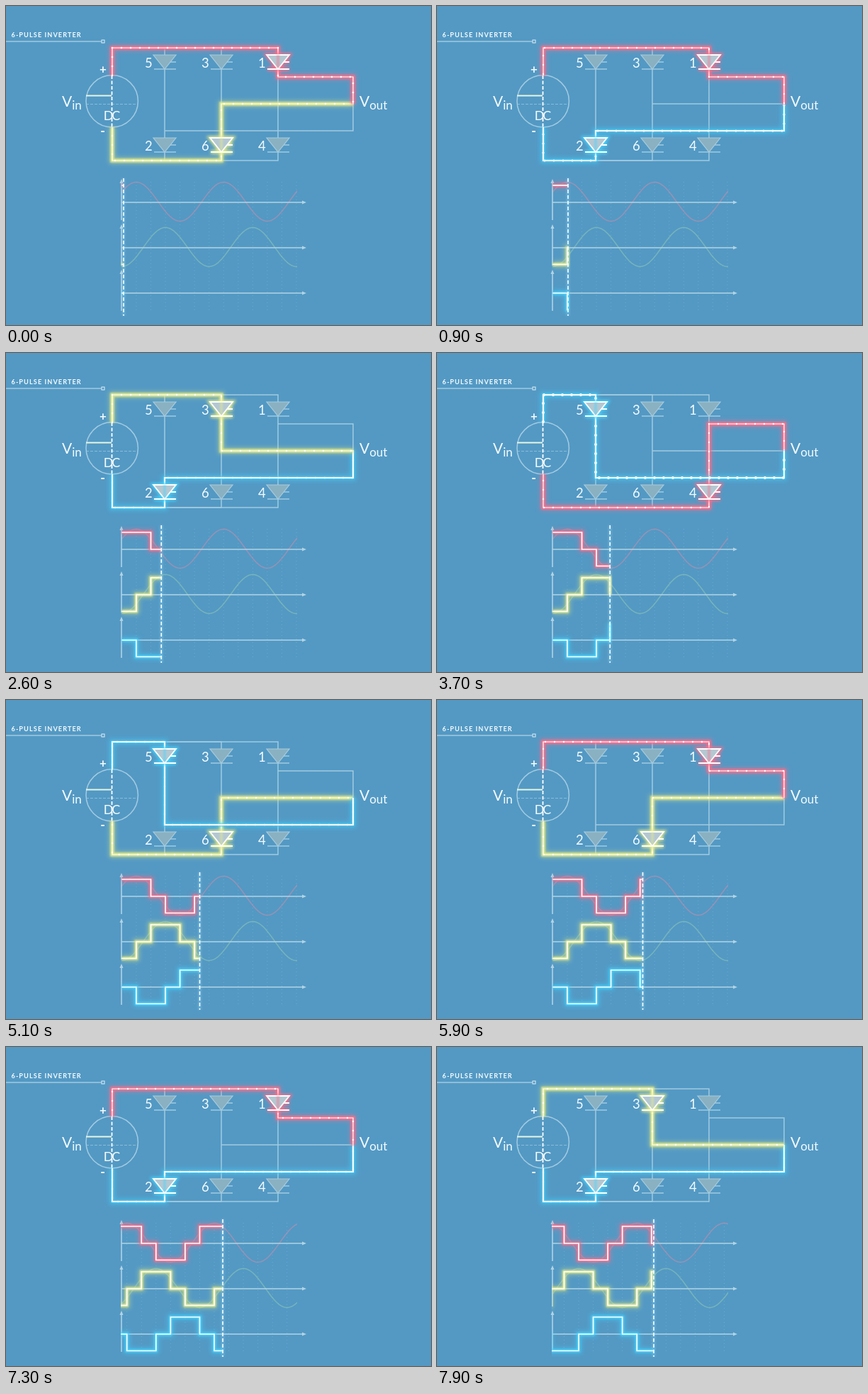
An HTML page that plays this animation: 600x450 px, repeating every 8000 ms.

```html
<!DOCTYPE html>
<html lang="en">
<head>
<meta charset="utf-8">
<title>6-pulse inverter</title>
<style>
html, body { margin: 0; width: 100%; height: 100%; overflow: hidden; background: #5399c4; }
svg { display: block; width: 600px; height: 450px; }
path, line, circle { fill: none; }
text { font-family: Lato, "Open Sans", sans-serif; fill: #f4fafd; }
.wire { stroke: #a3cae0; stroke-width: 1.5; }
.axis { stroke: #b2d3e5; stroke-width: 1.6; }
.tip { fill: #b2d3e5; }
.grid { stroke: #a8cfe4; stroke-dasharray: 1 4; opacity: .32; }
.sine { stroke-width: 1.5; opacity: .6; }
.glow { stroke-width: 6; filter: blur(1.3px); opacity: .9; }
.halo { stroke-width: 9; filter: blur(3px); opacity: .4; }
.core { stroke: #fff; }
.dots { stroke: #fff; stroke-linecap: round; stroke-dasharray: 0 13; }
.valve { fill: #89b1c2; stroke: #a9cbdc; stroke-width: 1.2; }
</style>
</head>
<body>
<svg id="stage" viewBox="0 0 600 450">
  <clipPath id="plot"><rect x="162" y="235" width="249" height="210"/></clipPath>
  <clipPath id="past"><rect id="pastBox" x="162" y="235" width="0" height="210"/></clipPath>
</svg>
<script>
const stage = document.getElementById('stage');
const UNIT = 20.55, START = 163.4, STOP = 306, LOOP = 8000;

const phases = [
  { x: 384, y: 100, top: 1, bottom: 4, base: 277, color: '#ff6d89', sine: '#c98ca8', core: 1.2 },
  { x: 304, y: 138, top: 3, bottom: 6, base: 341, color: '#e6ec88', sine: '#8ec6b4', core: 1.2 },
  { x: 224, y: 176, top: 5, bottom: 2, base: 405, color: '#45d5ff', core: 2.1 }
];
// Time and horizontal position of the plotting head, before scrolling.
const headKeys = [[0, 166], [900, 185], [2600, 219.3], [3700, 244.2],
                  [5100, 273.5], [6700, 307.5], [LOOP, 333]];

function add(tag, attrs, parent = stage) {
  const el = document.createElementNS('http://www.w3.org/2000/svg', tag);
  for (const name in attrs) el.setAttribute(name, attrs[name]);
  return parent.appendChild(el);
}
const path = (d, cls, attrs = {}, parent = stage) => add('path', { d, class: cls, ...attrs }, parent);

function label(x, y, size, str, sub, attrs = {}) {
  const el = add('text', { x, y, 'font-size': size, ...attrs });
  el.textContent = str;
  if (sub) add('tspan', { dy: 4, 'font-size': 17 }, el).textContent = sub;
}

const topWire = p => `M150 98V59H${p.x}V${p.y}H490V138`;
const bottomWire = p => `M490 138V${p.y}H${p.x}V218H150V171`;
const triangle = (x, y) => `M${x - 16} ${y}h32l-16 20z`;
const bars = (x, y) => `M${x - 15} ${y + 20}h31M${x + 8} ${y + 10}h8`;

// Circuit
path('M0 50H134.500', 'wire', { 'stroke-width': 1 });
add('rect', { x: 135, y: 48, width: 4, height: 4, fill: 'none', stroke: '#e2f0f7' });
for (const p of phases) path(topWire(p) + bottomWire(p), 'wire');
add('circle', { cx: 149.7, cy: 134.3, r: 36.7, class: 'wire' });
path('M113 138.500H186', 'wire', { style: 'stroke-width:1;stroke-dasharray:4 2;opacity:.7' });
path('M113 126.500H149', '', { stroke: '#e4f6e4', 'stroke-width': 1.8 });

// Charts
const moving = add('g', { 'clip-path': 'url(#plot)' });
const scroller = add('g', {}, moving);
for (let i = 1; i < 14; i++)
  path(`M${START + i * UNIT} 248V432`, 'grid', {}, scroller);
phases.forEach((p, i) => {
  if (!p.sine) return;
  let d = '';
  for (let x = 163; x < 442; x += 2) {
    const y = p.base - 1 - 27.5 * Math.cos((x - START - UNIT * (1 + 2 * i)) * Math.PI / UNIT / 3);
    d += (d ? 'L' : 'M') + x + ' ' + y.toFixed(1);
  }
  path(d, 'sine', { stroke: p.sine }, scroller);
});
for (const { base: y } of phases) {
  path(`M163 ${y + 25}V${y - 28}M163 ${y}H420`, 'axis');
  path(`M163 ${y - 33}l2.500 6h-5zM424 ${y}l-6-2.500v5z`, 'tip');
}

// A glowing line: soft colour, white core and optional running dots.
function makeGlow(parent) {
  const g = add('g', {}, parent);
  return { g, parts: ['halo', 'glow', 'core', 'dots'].map(c => path('', c, {}, g)) };
}
function setGlow({ parts: [halo, glow, core, dots] }, d, color, width, coreWidth, dotWidth = 0, shift = 0) {
  for (const el of [halo, glow, core, dots]) el.setAttribute('d', d);
  halo.style.stroke = glow.style.stroke = color;
  glow.style.strokeWidth = width;
  core.style.strokeWidth = coreWidth;
  dots.style.strokeWidth = dotWidth;
  dots.style.opacity = dotWidth ? 1 : 0;
  dots.style.strokeDashoffset = -shift;
}

const waveLayer = add('g', { 'clip-path': 'url(#past)' });
const waveScroller = add('g', {}, waveLayer);
const waves = phases.map(() => makeGlow(waveScroller));
const pastBox = document.getElementById('pastBox');
const cursorGlow = path('M0 243V437', '', { stroke: '#9be4ff', 'stroke-width': 4, opacity: .3, style: 'filter:blur(1.5px)' });
const cursor = path('M0 243V437', '', { stroke: '#fff', 'stroke-width': 1.6, 'stroke-dasharray': '5 3' });

const returnGlow = makeGlow(stage), supplyGlow = makeGlow(stage);

// Thyristors with their lit versions
const lit = {};
for (const p of phases) for (const [n, y] of [[p.top, 69], [p.bottom, 186]]) {
  path(triangle(p.x, y), 'valve');
  path(bars(p.x, y), 'wire');
  const g = lit[n] = add('g', {});
  path(triangle(p.x, y) + bars(p.x, y), '', { stroke: p.color, 'stroke-width': 5, style: 'filter:blur(2px)' }, g);
  path(triangle(p.x, y), '', { style: 'fill:#b4c8d2', stroke: '#fff', 'stroke-width': 1.8 }, g);
  path(bars(p.x, y), '', { stroke: '#fff', 'stroke-width': 1.8 }, g);
  path(`M${p.x} ${y}v18`, '', { stroke: p.color, 'stroke-width': 4, opacity: .45, style: 'filter:blur(1px)' }, g);
  label(p.x - 28, y + 18, 18.5, n, '', { 'text-anchor': 'start' });
}

path('M149.500 98V171', '', { stroke: '#fff', 'stroke-width': 1.8, 'stroke-dasharray': '5 2.5' });
label(7.5, 43.5, 9.2, '6-PULSE INVERTER', '', { 'font-weight': 700, 'letter-spacing': 1.05 });
label(79, 142, 21, 'V', 'in');
label(499, 142, 21, 'V', 'out');
label(148.5, 160.5, 18, 'DC', '', { 'text-anchor': 'middle', 'letter-spacing': -2 });
label(137, 95, 17, '+', '', { 'text-anchor': 'middle', 'font-weight': 700 });
label(136.5, 183, 18, '-', '', { 'text-anchor': 'middle', 'font-weight': 700 });

function headAt(t) {
  const i = headKeys.findIndex(k => k[0] > t);
  const [t0, x0] = headKeys[i - 1], [t1, x1] = headKeys[i];
  return x0 + (x1 - x0) * (t - t0) / (t1 - t0);
}
const supplyAt = k => Math.floor(k / 2) % 3;
const returnAt = k => (Math.floor((k + 1) / 2) + 1) % 3;
const returnPhase = k => [2, 0, 1][(returnAt(k) + 1) % 3];

function level(i, k) {
  return supplyAt(k) === i ? -24 : returnPhase(k) === i ? 23.5 : 0;
}

function draw(now) {
  const t = Math.floor(now % LOOP / 100) * 100;
  const head = headAt(t), shown = Math.min(head, STOP), scroll = shown - head;
  const state = (head + 1.6 - START) / UNIT, step = Math.floor(state);
  const fresh = Math.max(0, 1 - (state - step) * 4);

  for (const g of [scroller, waveScroller]) g.setAttribute('transform', `translate(${scroll})`);
  cursor.setAttribute('transform', `translate(${shown})`);
  cursorGlow.setAttribute('transform', `translate(${shown})`);
  pastBox.setAttribute('width', shown - 159);

  phases.forEach((p, i) => {
    let d = `M${START} ${p.base + level(i, 0)}`;
    for (let k = 1; k <= step; k++)
      d += `H${Math.min(START + k * UNIT, head)}V${p.base + level(i, k)}`;
    setGlow(waves[i], d + `H${head}`, p.color, 4.5, 1.7);
  });

  const a = phases[supplyAt(step)], b = phases[returnPhase(step)];
  const isNew = [step % 2 ? 0 : fresh, step % 2 ? fresh : 0];
  const run = t * .06;
  [[supplyGlow, a, topWire(a)], [returnGlow, b, bottomWire(b)]].forEach(([glow, p, d], i) => {
    const cyan = p === phases[2];
    setGlow(glow, d, p.color, cyan ? 3.5 : 5.5, p.core, 2.4 + 1.5 * isNew[i], run);
  });
  for (const n in lit) lit[n].style.display = +n === a.top || +n === b.bottom ? '' : 'none';
}

const begin = performance.now();
function tick() {
  draw(performance.now() - begin);
  requestAnimationFrame(tick);
}
tick();
</script>
</body>
</html>
```
